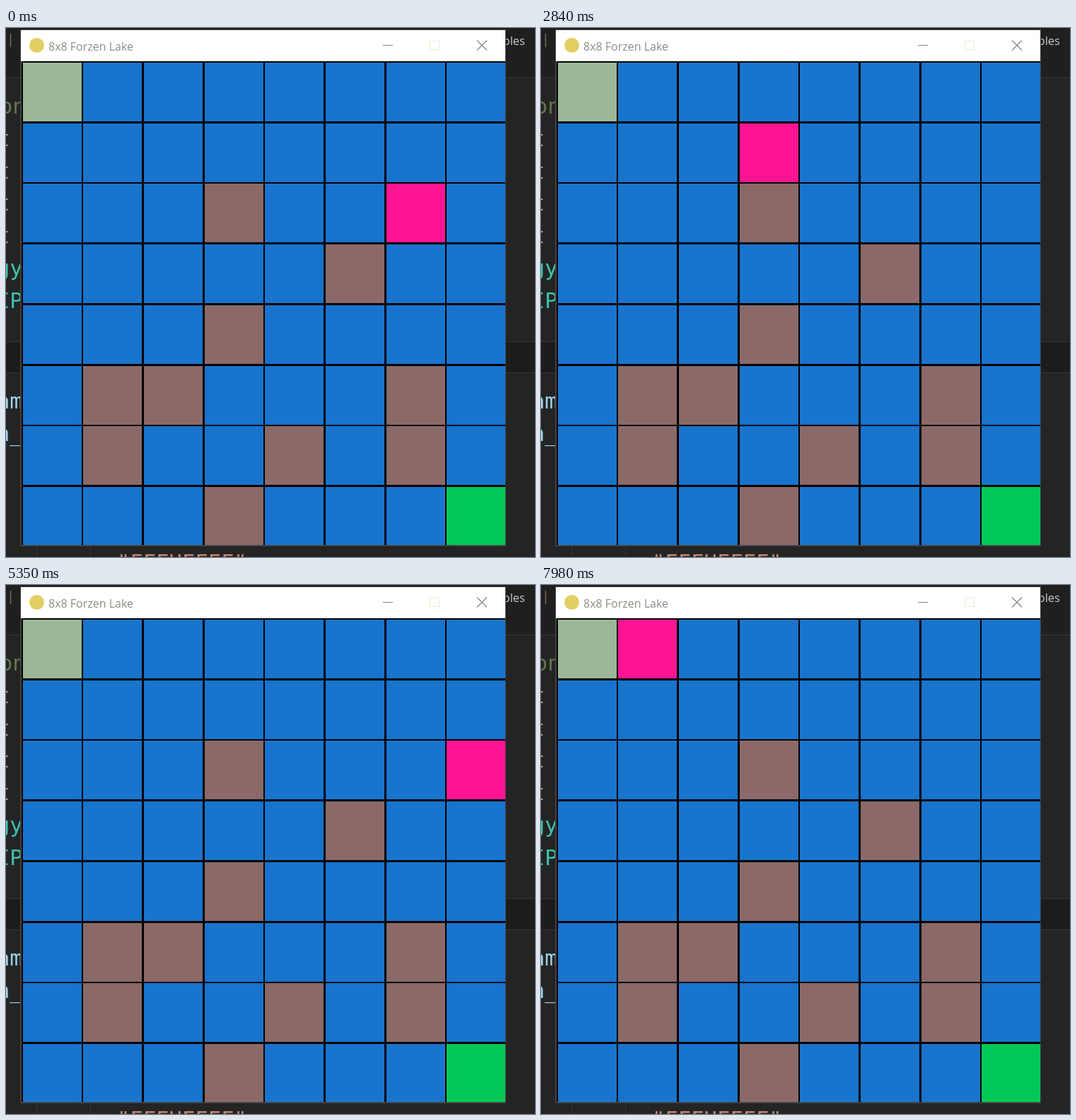
An HTML page that plays this animation: 748 by 748 pixels, repeating every 8 s.

```html
<!DOCTYPE html>
<html lang="en">
<head>
<meta charset="utf-8">
<title>8x8 Forzen Lake</title>
<style>
  html, body { margin: 0; width: 100%; height: 100%; overflow: hidden; background: #242424; }
  svg { display: block; width: 748px; height: 748px; }
  .code { font: 30.5px "DejaVu Sans Mono", monospace; white-space: pre; }
  .ui { font-family: "Open Sans", "Noto Sans", sans-serif; }
</style>
</head>
<body>
<svg viewBox="0 0 748 748">
  <!-- editor behind the window -->
  <rect width="748" height="748" fill="#242424"/>
  <rect width="748" height="70" fill="#1f1f1f"/>
  <rect y="444" width="748" height="43" fill="#1c1c1c"/>
  <path d="M0 70.5H748M0 443.5H748M0 487.5H748M43.5 732V748M119.5 732V748" stroke="#373737"/>
  <path d="M6.5 8V27" stroke="#76685c" stroke-width="1.5"/>
  <text class="ui" x="734" y="24" text-anchor="end" font-size="16.5" fill="#c8ccc8">Variables</text>
  <g class="code">
    <text x="-9" y="121" fill="#66754f">on</text>
    <g fill="#a9a29c">
      <text x="-13" y="167">t</text>
      <text x="-13" y="213">t</text>
      <text x="-13" y="258">t</text>
      <text x="-13" y="304">t</text>
    </g>
    <g fill="#3fc3ac">
      <text x="-13" y="350">gy</text>
      <text x="-13" y="396">IP</text>
    </g>
    <g fill="#9bd3e6">
      <text x="-13" y="538">am</text>
      <text x="-13" y="584">n_</text>
    </g>
    <text x="157" y="766" fill="#c08672">"FFFHFFFF"</text>
  </g>

  <!-- window frame and title bar -->
  <rect x="20" y="2" width="687" height="731" fill="#3c3c3c"/>
  <rect x="21" y="3" width="685" height="44" fill="#fff"/>
  <circle cx="43.5" cy="24.5" r="10.5" fill="#e3cf62"/>
  <text class="ui" x="60" y="31.5" font-size="16" fill="#8d8d83">8x8 Forzen Lake</text>
  <g fill="none" stroke="#85857d" stroke-width="1.2">
    <path d="M533 24.5H547M666 17.5L680 31.5M680 17.5L666 31.5"/>
    <rect x="599.5" y="18.5" width="13" height="12" stroke="#f1ecda"/>
  </g>

  <rect x="22" y="47" width="684" height="685" fill="#000"/>
  <rect x="21" y="47" width="1" height="685" fill="#4a4a4a"/>
  <rect x="21" y="731" width="685" height="1" fill="#4a4a4a"/>
  <g id="board"></g>
  <path id="cursor" d="M0 0V22.5L5 18L9 26.5L13 24.5L9.2 16.5H16Z" fill="#fff" stroke="#111" stroke-width="1.1" visibility="hidden"/>
</svg>
<script>
  const LOOP = 8000, FRAME = 69.5;
  const START_STATE = 8.7, STATES_PER_FRAME = 1.3725, STATES = 15;
  const GOAL = 14, GOAL_HOLD = 0.53;

  const LAKE = [
    'SFFFFFFF',
    'FFFFFFFF',
    'FFFHFFFF',
    'FFFFFHFF',
    'FFFHFFFF',
    'FHHFFFHF',
    'FHFFHFHF',
    'FFFHFFFG'
  ];
  const COLORS = { S: '#9ab898', F: '#1874cd', H: '#8b6969', G: '#00c957' };
  const AGENT = '#ff1493';
  const MOVES = 'RRRDRDRRRDDDDD';

  const board = document.getElementById('board');
  const cursor = document.getElementById('cursor');

  function addCell(row, col, fill) {
    const cell = document.createElementNS('http://www.w3.org/2000/svg', 'rect');
    const x = Math.round(23.7 + 85.65 * col), y = Math.round(49 + 85.7 * row);
    const size = { x, y, width: Math.min(83, 706 - x), height: Math.min(83, 731 - y), fill };
    for (const key in size) cell.setAttribute(key, size[key]);
    board.append(cell);
    return cell;
  }

  const cells = LAKE.map((line, row) =>
    [...line].map((kind, col) => addCell(row, col, COLORS[kind])));

  let row = 0, col = 0;
  const path = [cells[0][0]];
  for (const move of MOVES) {
    if (move === 'R') col++; else row++;
    path.push(cells[row][col]);
  }

  // The start tile hides the agent, and the goal is left after a short hold.
  function agentCell(frame) {
    const state = (START_STATE + frame * STATES_PER_FRAME) % STATES;
    const step = Math.floor(state);
    if (step === 0 || state > GOAL + GOAL_HOLD) return null;
    return path[step];
  }

  function cursorAt(frame) {
    if (frame < 84 || frame > 109) return null;
    if (frame < 86) return frame === 84 ? [346, 701] : [326, 648];
    if (frame < 107) return [306, 627];
    const out = frame - 106;
    return [306 - 4 * out, 627 + 25 * out];
  }

  let lit = null;
  function draw(now) {
    const frame = Math.floor((now % LOOP) / FRAME + 0.25);
    const cell = agentCell(frame);
    if (cell !== lit) {
      if (lit) lit.style.fill = '';
      if (cell) cell.style.fill = AGENT;
      lit = cell;
    }
    const spot = cursorAt(frame);
    cursor.setAttribute('visibility', spot ? 'visible' : 'hidden');
    if (spot) cursor.setAttribute('transform', `translate(${spot})`);
  }

  const begin = performance.now();
  function tick() {
    draw(performance.now() - begin);
    requestAnimationFrame(tick);
  }
  tick();
</script>
</body>
</html>
```
